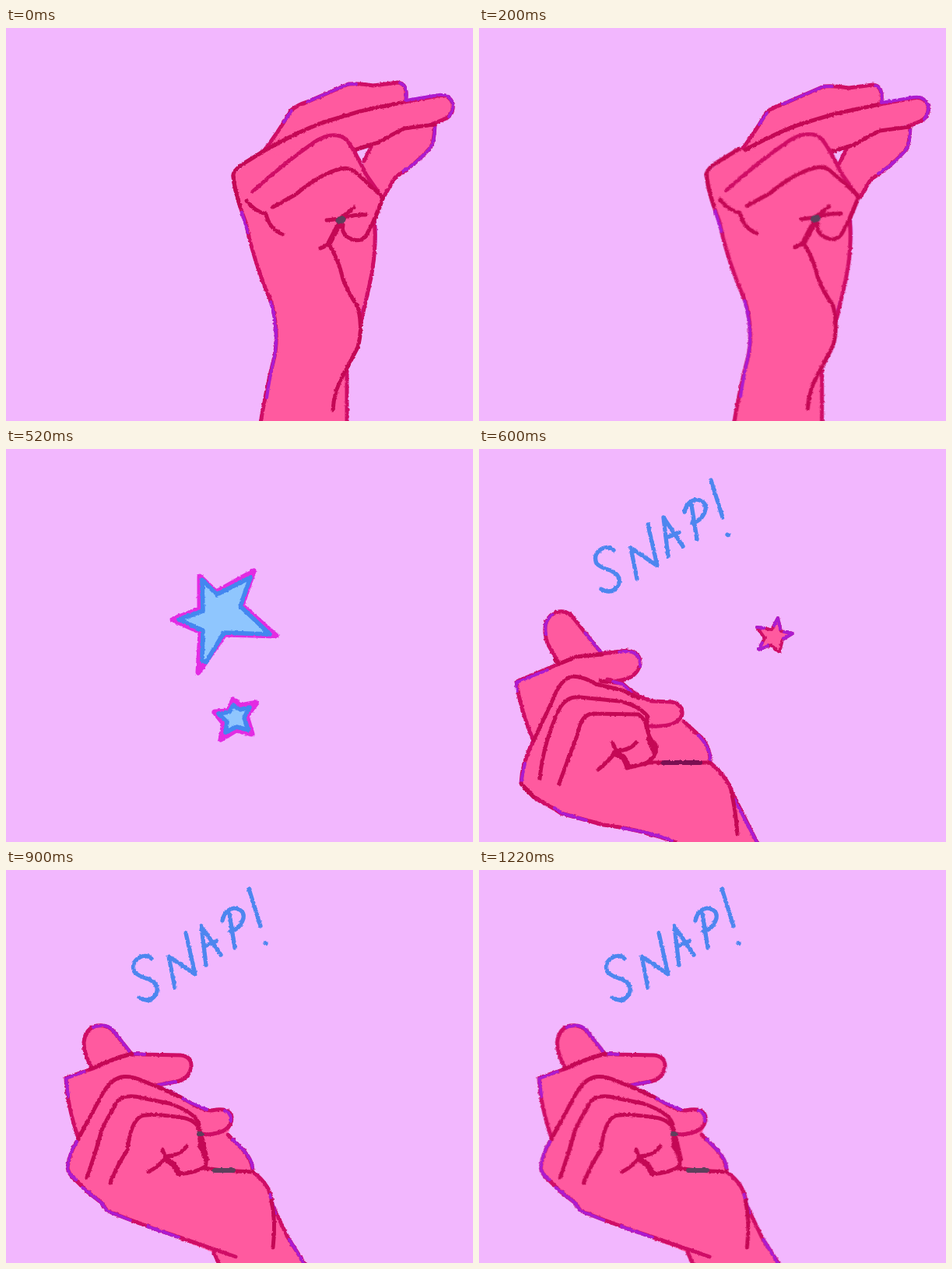
An HTML page for the animation above (1.3 s loop, 600 px wide and 505 px high).

```html
<!DOCTYPE html>
<html lang="en">
<head>
<meta charset="utf-8">
<title>Finger snap</title>
<style>
  html, body { margin: 0; width: 100%; height: 100%; overflow: hidden; background: #f2b7fe; }
  svg { display: block; width: 600px; height: 505px; }
  path { fill: none; stroke: #c40855; stroke-width: 5; stroke-linecap: round; stroke-linejoin: round; }
  .skin { fill: #ff5a9f; stroke: none; }
  .edge { stroke: #cf0d66; }
  .rim { stroke: #ac1bd0; stroke-width: 4; }
  .fold { stroke-width: 7.5; }
  .dark { stroke: #5d405c; stroke-width: 6; }
  .glow { fill: #f2b7fe; stroke: #e32be2; stroke-width: 7; }
  .star { fill: #8fc6fe; stroke: #4387f0; stroke-width: 5.6; }
  .word path { stroke: #4d86ef; stroke-width: 5.3; }

  .show, .move { animation: 1300ms step-end infinite; }
  .show { visibility: hidden; }
  .ready { animation-name: ready; }
  .stars { animation-name: stars; }
  .flick { animation-name: flick; }
  .swing { animation-name: swing; }
  .rest { animation-name: rest; }
  .word { animation-name: word; }
  .fingers { animation-name: fingers; }
  .palm { animation-name: palm; }
  .settle { animation-name: settle; }
  .rise { animation-name: rise; }

  /* 200, 400, 600, 800, 900 and 1100 ms of the loop */
  @keyframes ready { 0% { visibility: visible } 30.769%, 100% { visibility: hidden } }
  @keyframes stars { 0%, 46.154%, 100% { visibility: hidden } 30.769% { visibility: visible } }
  @keyframes flick { 0%, 61.538%, 100% { visibility: hidden } 46.154% { visibility: visible } }
  @keyframes swing { 0%, 69.231%, 100% { visibility: hidden } 61.538% { visibility: visible } }
  @keyframes rest { 0% { visibility: hidden } 69.231%, 100% { visibility: visible } }
  @keyframes word { 0% { visibility: hidden } 46.154%, 100% { visibility: visible } }
  @keyframes fingers { 0% { transform: none } 15.385%, 100% { transform: translate(3px, 3px) } }
  @keyframes palm { 0% { transform: none } 15.385%, 100% { transform: matrix(1.015, 0, 0, 1, -4, -1.5) } }
  @keyframes settle { 0% { transform: none } 84.615%, 100% { transform: scaleX(1.004) } }
  @keyframes rise {
    0% { transform: none }
    61.538% { transform: translate(5px, -5px) }
    69.231%, 100% { transform: translate(14px, -16px) }
  }
</style>
</head>
<body>
<svg viewBox="0 0 600 505" role="img" aria-label="A hand snaps its fingers: SNAP!">
  <filter id="crayon" filterUnits="userSpaceOnUse" x="-20" y="-20" width="640" height="545" color-interpolation-filters="sRGB">
    <feTurbulence type="fractalNoise" baseFrequency=".28" numOctaves="2" seed="4"/>
    <feDisplacementMap in="SourceGraphic" scale="3" xChannelSelector="R" yChannelSelector="G"/>
  </filter>

  <g filter="url(#crayon)">
    <!-- fingers pressed together -->
    <g class="show ready">
      <g class="move fingers">
        <path class="skin" d="M482,222 L500,192 Q545,162 548,148 L551,124 L510,130 L469,153 L459,173 L466,200Z"/>
        <path class="edge" d="M551,124 Q550,148 545,154 Q528,174 500,192 L487,214 M469,153 L460,171"/>
        <path class="rim" d="M551,128 Q550,148 545,154 Q528,174 510,184"/>
        <path class="skin" d="M326,163 L366,106 L440,72 L470,74 L505,70 Q514,73 514,92 L480,130 L340,185Z"/>
        <path class="edge" d="M329,161 Q350,134 366,106 Q374,99 387,95 L440,72 Q455,71 472,74 L503,70 Q516,71 514,91"/>
        <path class="rim" d="M357,121 L367,106 M387,95 L440,72 L450,72 M506,71 Q516,73 514,91"/>
        <path class="skin" d="M332,157 Q380,130 415,119 L450,109 L555,86 Q571,84 575,99 Q575,114 561,118 L510,130 L480,147 L447,157 L440,220 L320,220Z"/>
        <path d="M328,160 Q380,130 415,119 L455,107 L512,95"/>
        <path class="edge" d="M512,95 L555,87 Q569,84 574,97 Q576,113 561,118 L546,124"/>
        <path class="rim" d="M514,93 L556,86 Q569,84 574,97 Q575,107 569,114"/>
        <path d="M550,124 L512,129 Q495,137 479,147 L447,157"/>
      </g>
      <g class="move palm">
        <path class="skin" d="M292,189 L312,171 L335,157 L350,164 L416,139 Q434,138 445,152 L463,190 L484,219 L473,248 Q478,280 466,330 Q456,360 456,390 Q454,415 438,441 L438,520 L325,520 Q332,470 345,425 Q351,390 341,353 Q318,300 308,250 Q294,215 292,189Z"/>
        <path class="edge" d="M292,190 Q293,210 308,250 Q318,300 341,353 Q351,390 345,422 Q333,468 325,520"/>
        <path d="M333,157 L312,170 Q291,182 292,190 Q293,205 301,230"/>
        <path class="rim" d="M303,237 L311,263 M340,352 Q351,390 345,422 Q338,452 335,475 M474,249 Q477,285 466,335 L458,365"/>
        <path class="edge" d="M484,219 L473,246 Q477,285 467,330 L456,378 M438,441 L438,520"/>
        <path class="edge" d="M317,210 Q358,173 397,146 Q421,131 437,143 Q448,157 463,189 L484,219"/>
        <path d="M343,230 L372,214 Q404,187 430,181 Q442,178 452,188 L484,217"/>
        <path d="M309,222 Q320,236 334,239 Q339,259 355,265"/>
        <path d="M484,219 Q477,241 463,266 Q456,277 441,270 Q430,263 433,253"/>
        <path d="M412,247 L429,245 L447,231 M430,247 Q440,239 462,240"/>
        <path d="M429,249 L420,270 Q414,280 404,283"/>
        <path class="fold" d="M429,250 L416,275"/>
        <path d="M414,277 Q427,296 433,323 Q440,341 452,358 Q459,386 452,410 L436,441 Q421,465 420,491"/>
        <path class="dark" style="stroke-width:9" d="M428,247 L432,246"/>
      </g>
    </g>

    <!-- sparks -->
    <g class="show stars">
      <path class="glow" d="M249,164 L270,184 L318,157 L303,201 L347,240 L281,238 L247,287 L250,235 L214,219 L249,206Z"/>
      <path class="star" d="M252,168 L271,187 L314,165 L301,202 L339,238 L280,236 L257,274 L252,271 L253,233 L222,219 L253,208Z"/>
      <path class="glow" d="M292,322 L301,330 L322,326 L309,343 L316,366 L296,361 L276,373 L280,353 L268,338 L285,337Z"/>
      <path class="star" d="M292,329 L300,335 L313,332 L306,345 L311,361 L296,357 L282,364 L284,351 L273,340 L287,338Z"/>
    </g>

    <!-- the snap -->
    <g class="show flick">
      <path class="skin" d="M103,276 L88,250 Q80,225 92,214 Q105,204 118,213 L157,262 L190,259 Q208,261 207,277 Q202,294 183,296 L165,299 L184,302 Q210,327 248,325 Q262,328 261,342 L263,350 L285,370 Q298,385 297,403 L320,430 L330,455 L360,515 L265,515 L250,504 Q205,488 160,483 L105,468 L70,447 L54,430 Q55,400 70,375 Q53,335 48,299Z"/>
      <path class="edge" d="M103,276 L88,250 Q80,225 92,214 Q105,204 118,213 L157,262"/>
      <path class="rim" d="M86,238 Q83,221 94,213 M136,236 L157,262"/>
      <path class="edge" d="M70,375 Q53,335 48,299 L103,276 L125,267 L190,259 Q208,261 207,277 Q202,294 183,297 Q168,301 156,298"/>
      <path class="rim" d="M49,311 L48,300 L88,284 M180,261 Q208,256 207,279"/>
      <path d="M97,270 L103,276 L125,267 L158,264 M156,298 L184,301"/>
      <path class="edge" d="M165,296 L184,301 Q200,317 222,324 L247,325 Q262,328 261,341 Q255,358 220,356"/>
      <path class="rim" d="M172,299 L184,302 L195,312"/>
      <path class="edge" d="M263,350 L285,370 Q298,385 297,403 Q320,423 325,441 L361,513"/>
      <path class="rim" d="M282,368 Q298,385 297,400 M328,450 L360,511"/>
      <path class="edge" d="M70,375 Q55,403 54,430 L70,447 L96,462 L105,468 L160,483 Q205,488 252,505"/>
      <path class="rim" d="M59,404 L54,428 M97,461 L106,468 L138,477 M184,487 Q218,492 248,503"/>
      <path d="M54,430 L70,447 M70,375 L94,324 Q105,294 121,292 Q136,293 150,302 L184,310 L205,320"/>
      <path d="M78,424 Q82,380 103,334 Q113,317 130,319 L180,324 Q205,329 217,344"/>
      <path d="M103,430 Q116,394 127,366 Q130,344 144,340 L205,341 Q215,348 215,358"/>
      <path d="M216,345 Q214,370 227,380 Q230,396 212,405"/>
      <path d="M153,412 Q166,402 176,389 M171,377 L177,388 Q195,387 202,377 M176,389 L186,395 L190,410 L218,403 L296,403"/>
      <path class="fold" d="M174,391 L186,397 L191,407 M218,373 L226,389"/>
      <path class="dark" style="stroke:#7a1052" d="M237,403 L284,403"/>
      <path d="M324,440 Q330,465 332,495"/>
      <path class="edge" style="fill:#ff5a9f;stroke-width:4" d="M384,217 L388,234 L403,237 L390,245 L386,261 L375,252 L359,258 L367,243 L357,229 L376,232Z"/>
      <path class="rim" d="M379,227 L384,217 L387,231 M392,235 L403,237 L391,244 M371,253 L359,258 L364,249 M366,230 L357,229"/>
    </g>

    <!-- hand swinging back -->
    <g class="show swing">
      <path class="skin" d="M103,264 L92,243 Q87,225 95,214 Q110,203 125,212 L151,249 L212,250 Q225,253 224,266 Q220,283 200,286 L182,289 L215,307 L245,320 L262,321 Q275,322 275,334 L268,347 L290,365 Q306,380 307,397 Q331,418 331,440 L345,470 L374,515 L290,515 L263,500 L225,485 L160,468 L112,455 L95,441 L75,422 L63,403 Q66,380 80,355 Q67,315 62,284Z"/>
      <path class="edge" d="M103,264 L92,243 Q87,225 95,214 Q110,203 125,212 L151,249"/>
      <path class="rim" d="M92,240 Q88,224 95,214 Q102,208 110,208 M128,217 L143,238"/>
      <path class="edge" d="M80,355 Q67,315 62,284 L104,265 Q130,254 151,249 Q163,247 175,249 L212,250 Q225,253 224,266 Q220,283 200,286 L179,289"/>
      <path class="rim" d="M208,250 Q226,252 224,267 M184,288 L205,285"/>
      <path d="M102,266 Q130,254 152,249"/>
      <path class="edge" d="M180,289 L215,307 L245,320 L262,321 Q275,322 275,334 Q271,351 236,350"/>
      <path class="rim" d="M183,291 L215,307 L245,320 M263,321 Q275,323 275,334"/>
      <path class="edge" d="M268,347 L290,365 Q306,380 307,397 M300,398 Q330,418 331,440 L345,470 L374,515"/>
      <path class="rim" d="M284,360 Q306,380 306,393 M332,446 L345,470 L372,512"/>
      <path class="edge" d="M80,355 Q66,380 63,403 L75,422 L95,441 L105,445 L112,455 L160,468 L225,485 L266,501 L290,515"/>
      <path class="rim" d="M72,370 Q65,384 63,403 L75,422 L95,441 M112,455 L152,466 M205,480 L226,485 L262,499"/>
      <path d="M80,355 L101,315 Q116,282 130,278 Q144,275 160,283 L185,293 L210,305"/>
      <path d="M88,408 Q97,364 113,327 Q122,306 137,305 L170,311 L215,321 Q232,328 236,345"/>
      <path d="M119,414 Q137,381 146,343 Q151,328 165,326 L210,330 Q231,333 235,350"/>
      <path d="M234,346 Q234,367 243,378 Q243,392 230,395 L206,402"/>
      <path class="fold" d="M235,356 L242,374 M189,380 L200,388 L206,401"/>
      <path d="M165,398 Q179,391 189,380 L185,370 M190,377 Q208,376 215,367 M238,394 L262,397 L302,399"/>
      <path class="dark" d="M250,396 L292,398"/>
      <path d="M331,438 Q337,465 334,495"/>
    </g>

    <!-- hand at rest -->
    <g class="show rest">
      <g class="move settle">
        <path class="skin" d="M112,254 Q100,235 100,222 Q102,203 117,200 Q130,198 138,207 L162,237 L225,238 Q238,240 238,253 Q235,268 220,272 L194,278 L235,298 L262,309 Q288,304 290,318 Q291,332 283,339 L305,360 Q317,372 317,388 Q341,405 342,430 L362,472 L388,515 L276,515 L268,492 Q180,458 130,438 L122,427 L90,399 Q79,390 79,382 Q82,360 93,345 Q78,300 77,267Z"/>
        <path class="edge" d="M109,252 Q100,235 100,222 Q102,203 117,200 Q130,198 138,207 L161,236"/>
        <path class="rim" d="M112,202 Q130,196 138,207 L158,232"/>
        <path class="edge" d="M93,345 Q78,300 77,267 L112,255 L140,243 Q157,235 176,237 L225,238 Q239,240 238,253 Q235,269 218,272 L192,277"/>
        <path class="rim" d="M80,291 L77,268 L101,259 M160,236 L178,237 M196,276 L218,272"/>
        <path d="M109,255 L141,242 L162,236"/>
        <path class="edge" d="M192,277 Q219,288 235,298 Q252,309 264,309 Q288,304 290,318 Q290,338 258,340 L248,338"/>
        <path class="rim" d="M194,278 Q219,288 237,299 L258,308 M281,309 Q290,313 289,323"/>
        <path class="edge" d="M285,340 L303,358 Q317,372 317,388 Q341,405 342,430 L362,472 L388,513"/>
        <path class="rim" d="M291,346 L305,360 Q316,372 317,383 M339,417 L346,441 M364,475 L386,511"/>
        <path class="edge" d="M93,345 Q82,362 79,382 Q80,391 90,399 L104,413 L122,427 L130,438 Q180,458 220,471 L295,497 M267,491 L277,514"/>
        <path class="rim" d="M91,349 Q82,362 79,382 Q80,391 90,398 M98,408 L122,427 L130,438 L160,450 M182,458 L222,472"/>
        <path d="M93,345 L120,295 Q132,270 148,266 Q160,264 176,271 L200,281 L224,292"/>
        <path d="M104,395 Q115,364 124,331 L143,297 Q154,287 175,293 L210,300 Q244,312 248,327"/>
        <path d="M134,402 Q143,379 156,360 Q160,323 174,316 Q187,312 225,318 Q246,321 249,336"/>
        <path d="M249,333 L249,356 Q260,369 256,381 Q244,389 222,391"/>
        <path class="fold" d="M251,345 L257,371 M205,371 L216,379 L221,389"/>
        <path d="M183,388 Q196,381 205,370 L201,359 M206,368 Q225,366 232,355 M254,383 L278,386 L317,388"/>
        <path class="dark" d="M268,386 L292,386 M248,339 L251,339"/>
        <path d="M341,425 Q347,452 343,485"/>
      </g>
    </g>

    <!-- lettering -->
    <g class="show word">
      <g class="move rise">
        <path d="M173,130 Q167,124 158,128 Q146,135 151,147 Q157,153 169,156 Q184,163 179,175 Q171,188 157,180"/>
        <path d="M203,167 L195,127 L229,150 L217,97"/>
        <path d="M243,138 L237,88 L262,125 M241,114 L257,107"/>
        <path d="M273,72 L280,116 M264,81 Q267,67 279,65 Q293,67 291,78 Q287,92 274,95"/>
        <path d="M298,40 L313,88 M319,110 L320,110.5"/>
      </g>
    </g>
  </g>
</svg>
</body>
</html>
```
